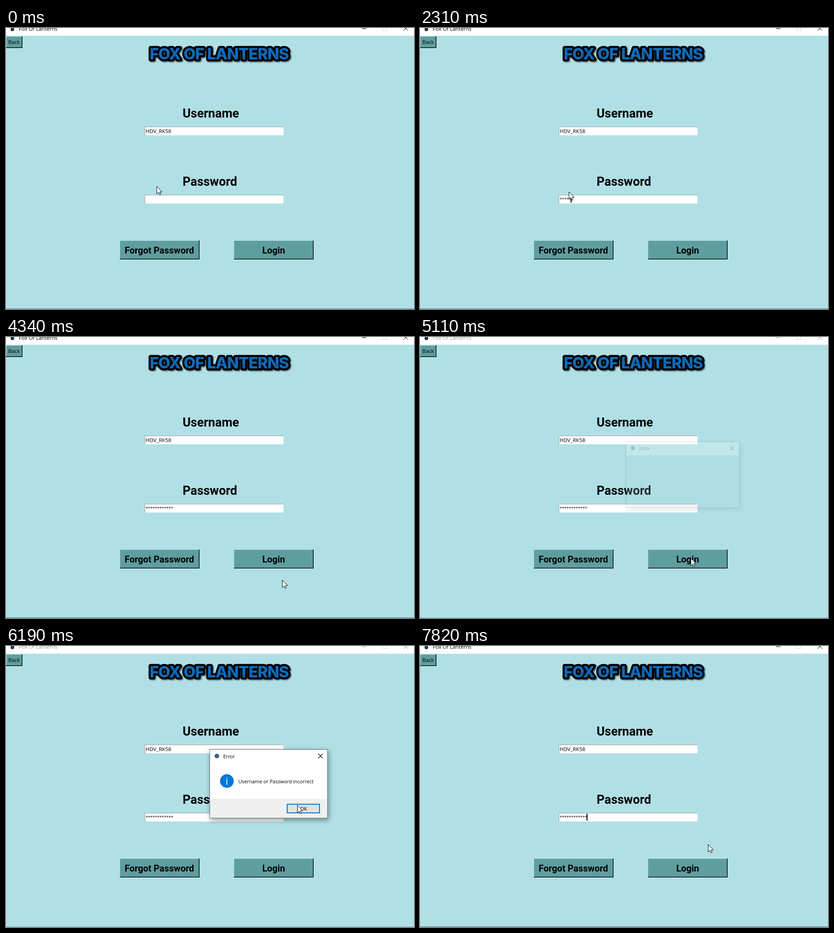
An HTML page for the animation above (7.91 s loop, 894 by 618 pixels).

```html
<!DOCTYPE html>
<html lang="en">
<head>
<meta charset="utf-8">
<title>Login</title>
<style>
  html, body { margin: 0; width: 100%; height: 100%; overflow: hidden; background: #b0e0e6; }
  svg { display: block; width: 894px; height: 618px; font: 11.5px "Open Sans", "Noto Sans", sans-serif; }
  rect { shape-rendering: crispEdges; }
  .label { font: 600 27px Roboto, sans-serif; }
  .action { font: 600 20px Roboto, sans-serif; text-anchor: middle; }
  .logo {
    font: 800 34px Inter, sans-serif; letter-spacing: -1px; word-spacing: 1px; text-anchor: middle;
    fill: url(#worn); stroke: #000; stroke-width: 9px; stroke-linejoin: round; paint-order: stroke;
    filter: drop-shadow(2px 2px 1px #0008);
  }
  .line { fill: none; stroke: currentColor; }
  #bar { fill: currentColor; }
  #dialog { color: #000; filter: drop-shadow(2px 4px 6px #0006); }
  #dialog text { font-size: 10.8px; }
  #dialog .info { font-size: 22px; fill: #fff; }
  .mid { text-anchor: middle; }
  #stars { font-size: 9.1px; }
</style>
</head>
<body>
<svg viewBox="0 0 894 618">
  <defs>
    <pattern id="worn" width="60" height="30" patternUnits="userSpaceOnUse">
      <rect width="60" height="30" fill="#0d6dbd"/>
      <path id="scratches" stroke="#0a2f50"/>
    </pattern>
  </defs>
  <rect width="894" height="618" fill="#b0e0e6"/>
  <rect width="894" height="17" fill="#fff"/>
  <rect id="edge" y="617" width="894" height="1"/>

  <circle cx="14" cy="3" r="4" fill="#1d3a4a"/>
  <g id="bar">
    <text x="28" y="6">Fox Of Lanterns</text>
    <rect x="780" y="1" width="10" height="1"/>
    <path class="line" d="M871 -4l10 10M881 -4l-10 10"/>
  </g>
  <path d="M825.5 0v5.5h9v-5.5" fill="none" stroke="#ccdcd8"/>

  <text class="logo" x="467" y="69">FOX OF LANTERNS</text>
  <g id="controls"></g>
  <text x="5" y="35">Back</text>
  <text class="label" x="387" y="197">Username</text>
  <text class="label" x="387" y="347">Password</text>
  <text class="action" x="336" y="496">Forgot Password</text>
  <text class="action" x="586.5" y="496">Login</text>
  <text x="306" y="231">HDV_RK58</text>
  <text id="stars" x="306" y="380"></text>
  <rect id="caret" y="369" width="2" height="15"/>

  <g id="dialog">
    <rect id="panel" x="447" y="228" width="257" height="150"/>
    <rect x="447" y="228" width="257" height="30" fill="#fff"/>
    <circle cx="462" cy="242" r="5" fill="#3d5f74"/>
    <text x="476" y="247">Error</text>
    <path id="cross" class="line" d="M684 237l10 10M694 237l-10 10" stroke-width="1.1"/>
    <g id="message">
      <rect x="447" y="336" width="257" height="42" fill="#f0f0f0"/>
      <circle cx="484" cy="297" r="15" fill="#0078d7"/>
      <text class="info mid" x="484" y="305">i</text>
      <text x="509" y="302">Username or Password incorrect</text>
      <rect id="ok" x="616" y="348" width="71" height="19" stroke="#0078d7"/>
      <text class="mid" x="652" y="362">OK</text>
    </g>
    <rect x="446.5" y="227.5" width="258" height="151" fill="none" stroke="#60696c"/>
  </g>

  <path id="pointer" d="M.5 .5V17L4.3 13.4L6.8 18.9L9.2 17.9L6.8 12.4H12Z" fill="#fff" stroke="#000"/>
</svg>
<script>
const LOOP = 7910;
const OPEN = 5070, CLOSE = 6590;
const $ = id => document.getElementById(id);
const clamp = (v, max = 1) => Math.max(0, Math.min(max, v));
const ease = k => k * k * (3 - 2 * k);
const set = (id, attrs) => { for (const k in attrs) $(id).setAttribute(k, attrs[k]); };
const box = (x, y, w, h, fill) => `<rect x="${x}" y="${y}" width="${w}" height="${h}" fill="${fill}"/>`;

const button = (x, y, w, h) =>
  box(x, y, w, h, '#000') + box(x, y, w - 1, h - 1, '#afdde0') +
  box(x + 1, y + 1, w - 2, h - 2, '#395f60') + box(x + 1, y + 1, w - 3, h - 3, '#5f9ea0');
const entry = y => box(304, y, 304, 19, '#a0a0a0') + box(305, y + 1, 303, 18, '#fff');

$('controls').innerHTML = button(0, 18, 36, 26) + button(249, 467, 175, 42) +
  button(499, 467, 175, 42) + entry(217) + entry(367);

let seed = 7;
const random = n => (seed = seed * 16807 % 2147483647) % n;
set('scratches', {
  d: Array.from({ length: 30 }, () =>
    `M${random(60)} ${random(30)}l${random(5) - 2} ${random(5) + 1}`).join('')
});

// resting points of the pointer: time, x, y
const stops = [
  [0, 330, 348], [700, 327, 357], [2800, 326, 361], [3470, 355, 373], [3870, 355, 373],
  [4340, 605, 534], [4800, 593, 487], [5500, 593, 484], [6030, 635, 328],
  [6190, 638, 350], [6660, 637, 358], [7600, 631, 436], [LOOP, 631, 436]
];

function pointerAt(t) {
  const i = stops.findIndex(s => s[0] > t);
  const [a, b] = [stops[i - 1], stops[i]];
  const k = ease((t - a[0]) / (b[0] - a[0]));
  return [1, 2].map(n => Math.round(a[n] + (b[n] - a[n]) * k));
}

function draw(t) {
  const active = t < OPEN || t >= CLOSE;
  set('bar', { color: active ? '#000' : '#999' });
  set('edge', { fill: active ? '#45777c' : '#8fb3b7' });

  const typed = clamp(Math.floor((t - 1100) / 240), 12);
  const typing = typed > 0 && typed < 12;
  const blink = (t - 90) % 900 < 600;
  $('stars').textContent = '*'.repeat(typed);
  set('caret', { x: 305 + 5 * typed, opacity: +(t > 230 && active && (typing || blink)) });

  const opening = clamp((t - OPEN) / 190);
  const closing = clamp((t - CLOSE) / 160);
  const scale = 0.95 + 0.05 * opening - 0.045 * closing;
  const loaded = t > OPEN + 110;
  const pressed = t > CLOSE - 160;
  set('dialog', {
    opacity: opening * (1 - closing),
    transform: `translate(575.5 ${303 - closing}) scale(${scale}) translate(-575.5 -303)`
  });
  set('panel', { fill: loaded ? '#fff' : '#abdade' });
  set('message', { opacity: +loaded });
  set('cross', { opacity: +(closing === 0) });
  set('ok', { fill: pressed ? '#cce4f7' : '#e1e1e1', 'stroke-width': pressed ? 1 : 2 });

  set('pointer', { transform: `translate(${pointerAt(t)})` });
}

const start = performance.now();
function tick() {
  draw((performance.now() - start) % LOOP);
  requestAnimationFrame(tick);
}
tick();
</script>
</body>
</html>
```
